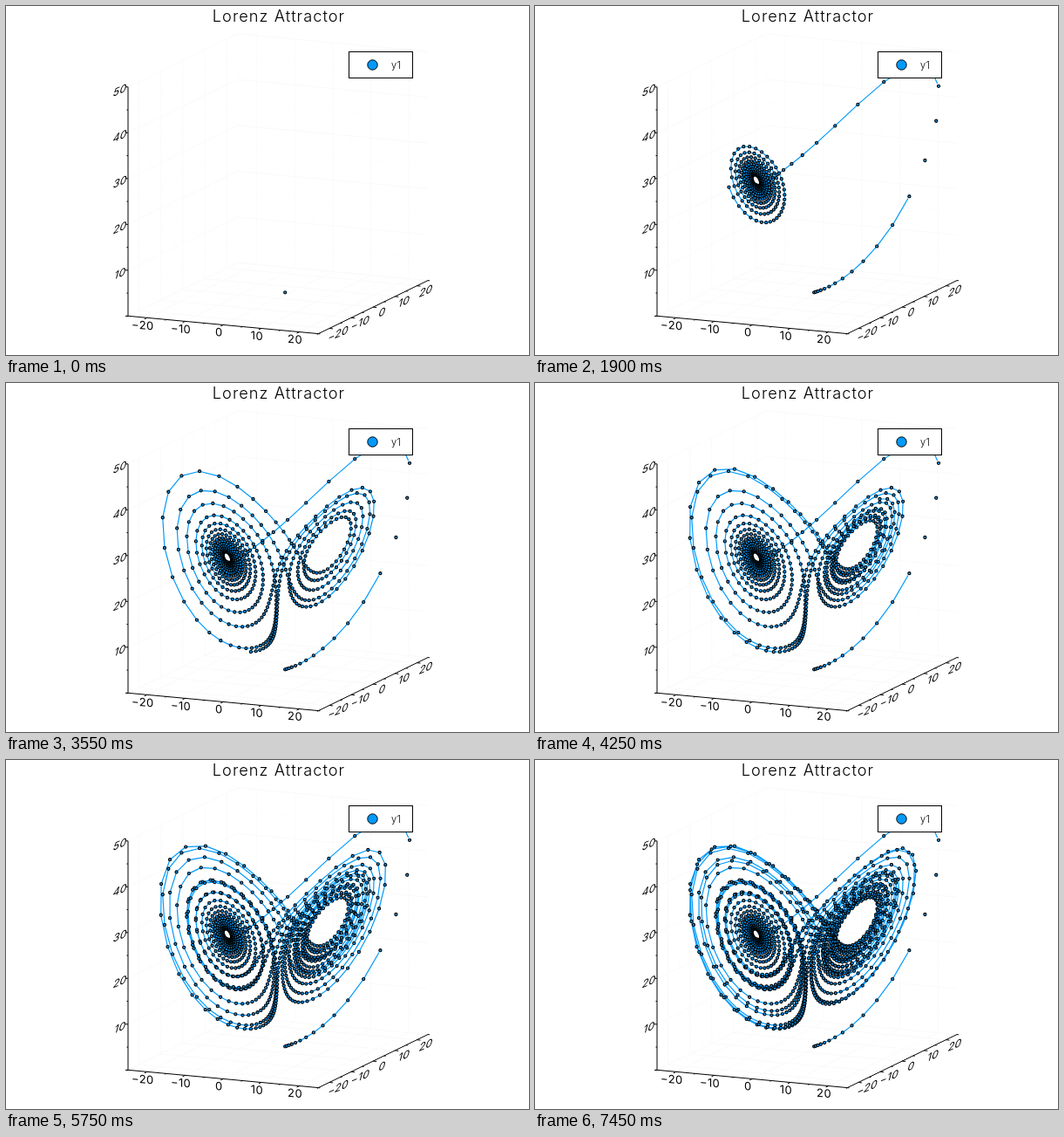
Recreate the animation shown at these times as an HTML page. Size 600x400 px, loop 7500 ms.

```html
<!DOCTYPE html>
<html lang="en">
<head>
<meta charset="utf-8">
<title>Lorenz Attractor</title>
<style>
  html, body { margin: 0; width: 100%; height: 100%; overflow: hidden; background: #fff; }
  svg { display: block; }
  text { font-family: Inter, "Open Sans", sans-serif; font-weight: 300; fill: #000; }
  #labels text { font-weight: 400; }
</style>
</head>
<body>
<svg id="stage" width="600" height="400" viewBox="0 0 600 400">
  <rect width="600" height="400" fill="#fff"/>
  <g fill="none">
    <path id="minorGrid" stroke="#fefefe"/>
    <path id="majorGrid" stroke="#fafafa"/>
    <path id="axes" stroke="#000"/>
  </g>
  <g id="labels" font-size="13" letter-spacing=".4" text-anchor="middle"></g>
  <path id="curve" fill="none" stroke="#009afa" stroke-width="1.2"/>
  <g id="markers" fill="#009afa" stroke="#000" stroke-width="1.1"></g>
  <text x="313" y="18" font-size="18.2" letter-spacing="1.05" text-anchor="middle">Lorenz Attractor</text>
  <rect x="393.5" y="52.5" width="73" height="30" fill="#fff" stroke="#000"/>
  <circle cx="420.5" cy="67.5" r="5.7" fill="#009afa" stroke="#000"/>
  <text x="442" y="72" font-size="11" letter-spacing=".5">y1</text>
</svg>
<script>
const LOOP = 7500, FRAME = 50, STEPS_PER_FRAME = 10;
const FRAMES = LOOP / FRAME;
const LOW = [-25, -25, 0], HIGH = [25, 25, 50];
const $ = id => document.getElementById(id);

function add(parent, tag, attributes) {
  const node = document.createElementNS("http://www.w3.org/2000/svg", tag);
  for (const key in attributes) node.setAttribute(key, attributes[key]);
  return parent.appendChild(node);
}

// Orthographic view of the data box
function project([x, y, z]) {
  const u = (x + 25) / 50, v = (y + 25) / 50, w = z / 50;
  return [140 + 218.4 * u + 125.6 * v, 355.3 + 20.3 * u - 61 * v - 262.5 * w];
}
const coords = p => p.map(n => n.toFixed(2)).join(" ");
const segment = (a, b) => `M${coords(project(a))}L${coords(project(b))}`;

function drawGrid() {
  let major = "", minor = "";
  for (let s = -25; s <= 25; s += 5) {
    const z = s + 25;
    const lines = (isMajor, ...pairs) => {
      const d = pairs.map(([a, b]) => segment(a, b)).join("");
      if (isMajor) major += d; else minor += d;
    };
    lines(s % 10 === 0,
      [[s, -25, 0], [s, 25, 0]], [[s, 25, 0], [s, 25, 50]],
      [[-25, s, 0], [25, s, 0]], [[-25, s, 0], [-25, s, 50]]);
    lines(z % 10 === 0,
      [[-25, -25, z], [-25, 25, z]], [[-25, 25, z], [25, 25, z]]);
  }
  $("majorGrid").setAttribute("d", major);
  $("minorGrid").setAttribute("d", minor);
}

function drawAxes() {
  let d = segment([-25, -25, 0], [-25, -25, 50]) +
          segment([-25, -25, 0], [25, -25, 0]) +
          segment([25, -25, 0], [25, 25, 0]);
  const tick = (point, value, [dx, dy], [lx, ly], skew, hidden) => {
    const [x, y] = project(point), major = value % 10 === 0;
    const length = major ? 1 : 0.5;
    d += `M${coords([x, y])}l${dx * length} ${dy * length}`;
    if (!major || hidden) return;
    const label = add($("labels"), "text", {
      y: 4.6, transform: `matrix(${skew} ${x + lx} ${y + ly})`
    });
    label.textContent = String(value).replace("-", "−");
  };
  const slanted = ".92 -.38 -.27 1";
  for (let s = -25; s <= 25; s += 5) {
    tick([s, -25, 0], s, [-3, 1.5], [-5, 8.4], "1 .09 0 1");
    tick([25, s, 0], s, [4, 0.4], [10.5, 5.7], slanted);
    tick([-25, -25, s + 25], s + 25, [-3, 0], [-9, 3.6], slanted, s === -25);
  }
  $("axes").setAttribute("d", d);
}

function trajectory(count) {
  const dt = 0.02, sigma = 10, rho = 28, beta = 8 / 3;
  let x = 1, y = 1, z = 1;
  return Array.from({ length: count }, () => {
    x += dt * (sigma * (y - x));
    y += dt * (x * (rho - z) - y);
    z += dt * (x * y - beta * z);
    return [x, y, z];
  });
}

// Keeps the part of a segment that lies inside the data box
function clippedSegment(a, b) {
  let start = 0, end = 1;
  for (let i = 0; i < 3; i++) {
    const delta = b[i] - a[i];
    const t1 = (LOW[i] - a[i]) / delta, t2 = (HIGH[i] - a[i]) / delta;
    start = Math.max(start, Math.min(t1, t2));
    end = Math.min(end, Math.max(t1, t2));
  }
  if (start >= end) return "";
  const at = t => a.map((n, i) => n + (b[i] - n) * t);
  return segment(at(start), at(end));
}

drawGrid();
drawAxes();

const points = trajectory((FRAMES - 1) * STEPS_PER_FRAME + 1);
const segments = points.map((p, i) => i ? clippedSegment(points[i - 1], p) : "");
const markers = points.map(p => {
  const [cx, cy] = project(p);
  return add($("markers"), "circle", {
    cx: cx.toFixed(2), cy: cy.toFixed(2), r: 1.6, display: "none"
  });
});

let shown = 0;
function render(time) {
  const frame = Math.floor((time % LOOP) / FRAME);
  const count = frame * STEPS_PER_FRAME + 1;
  if (count === shown) return;
  for (let i = Math.min(count, shown); i < Math.max(count, shown); i++) {
    markers[i].setAttribute("display", i < count ? "inline" : "none");
  }
  $("curve").setAttribute("d", segments.slice(0, count).join(""));
  shown = count;
}

const origin = performance.now();
function tickClock() {
  render(performance.now() - origin);
  requestAnimationFrame(tickClock);
}
tickClock();
</script>
</body>
</html>
```
